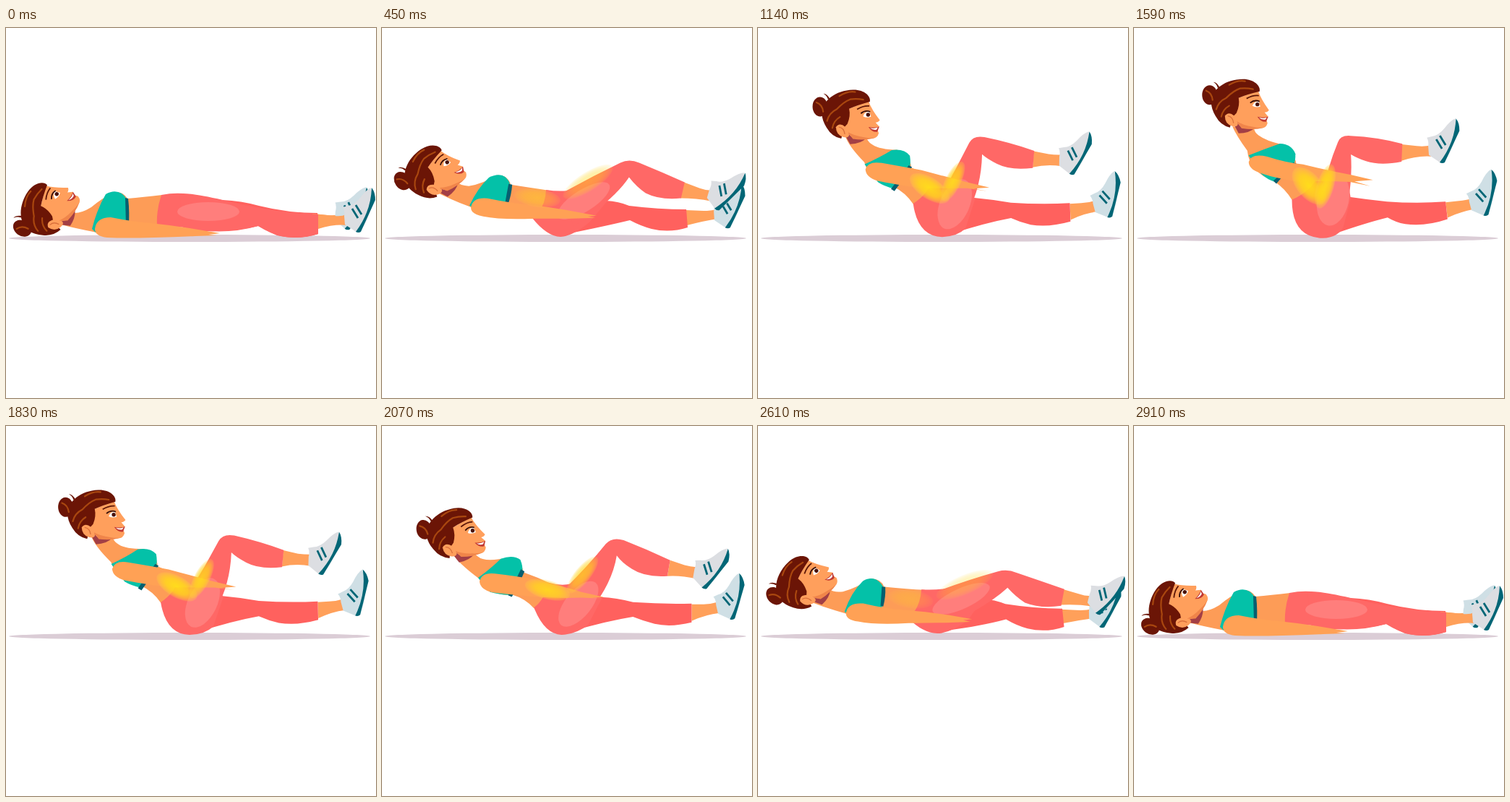
An HTML page that plays this animation: 512x512 px, repeating every 3.6 s.

```html
<!DOCTYPE html>
<html lang="en">
<head>
<meta charset="utf-8">
<title>Crunch exercise</title>
<style>
  html, body { margin: 0; width: 100%; height: 100%; overflow: hidden; background: #fff; }
  svg { display: block; width: 100%; height: 100%; }
</style>
</head>
<body>
<svg viewBox="0 0 512 512">
  <defs>
    <radialGradient id="glow">
      <stop offset="0" stop-color="#ffe414"/>
      <stop offset=".55" stop-color="#ffd81c" stop-opacity=".92"/>
      <stop offset=".78" stop-color="#ffd426" stop-opacity=".65"/>
      <stop offset="1" stop-color="#ffd83a" stop-opacity=".2"/>
    </radialGradient>
    <g id="shoe">
      <path d="M444 125Q437 128 429 139Q421 149 412 150L405 152Q408 157 407 164L408 176L425 187Q438 180 447 142Z"/>
      <path fill="#006676" d="M445 125Q450 131 450 142L430 186Q427 188 423 186Q444 158 445 125Z"/>
      <path stroke="#006676" stroke-width="2.8" d="M418 154L426 167M423 149L431 162"/>
    </g>
  </defs>
  <ellipse cx="254" cy="291" rx="250" ry="5" fill="#dbcdd6"/>
  <path id="farAnkle" fill="#ffa05a"/>
  <use id="farShoe" href="#shoe" fill="#cfdfe5"/>
  <path id="farLeg" fill="#ff615e"/>
  <path id="torso" fill="#fd9c57"/>
  <g id="head">
    <path fill="#a33f45" d="M137 128L169 137Q161 145 146 145Z"/>
    <path fill="#6b1506" d="M117 82Q116 77 111 74Q116 74 120 82Z"/>
    <ellipse cx="106" cy="92" rx="10.5" ry="13.5" fill="#6b1506"/>
    <path fill="#ff9f5c" d="M140 98L173 86Q177 98 188 113Q186 116 182 116L187 122L184 125L186 131Q184 138 177 138Q162 140 150 137Q142 130 138 118Z"/>
    <path fill="#f0854a" d="M143 128Q152 134 166 136Q175 138 181 137Q168 141 150 138Z"/>
    <path fill="#6b1506" d="M108 101C109 84 128 70 152 70C168 70 177 80 175 87Q158 91 146 96Q148 106 143 117L138 122L134 137Q121 134 114 121Q108 111 108 101Z"/>
    <g fill="none" stroke="#a9470f" stroke-width="2.2" stroke-linecap="round">
      <path d="M101 86Q109 89 110 99M115 112Q118 101 129 96Q139 86 148 83Q157 82 166 84M122 122Q124 112 133 107M133 78Q145 71 155 73"/>
    </g>
    <path fill="#ff9f5c" d="M140 121Q132 114 127 121Q127 132 137 135Q144 137 145 132Z"/>
    <path fill="none" stroke="#d9703c" stroke-width="1.3" d="M131 121Q138 122 139 131"/>
    <path fill="none" stroke="#5b1608" stroke-width="1.8" d="M157 97Q166 92 174 93"/>
    <path fill="#fff" d="M165 107Q168 100 174 101L176 108Q170 110 165 107Z"/>
    <circle cx="172" cy="105" r="2.7" fill="#4a1209"/>
    <path fill="none" stroke="#38100a" stroke-width="1.8" d="M162 103Q168 98 175 101"/>
    <path fill="#c13832" d="M172 122Q180 124 187 122L184 129Q177 130 172 122Z"/>
    <path fill="#fff" d="M174 123Q180 125 185 123L183 126Q178 127 174 123Z"/>
  </g>
  <path id="bra" fill="#04c1a8"/>
  <path id="band" fill="#075f70"/>
  <path id="hip" fill="#ff6866"/>
  <path id="nearAnkle" fill="#ffa05a"/>
  <use id="nearShoe" href="#shoe" fill="#dcdee2"/>
  <path id="nearLeg" fill="#ff6866"/>
  <circle id="shine" r="1" fill="#ff7e7c"/>
  <path id="arm" fill="#ffa155"/>
  <circle id="bellyGlow" r="1" fill="url(#glow)"/>
  <circle id="thighGlow" r="1" fill="url(#glow)"/>
</svg>
<script>
const LOOP = 3600, STEP = 30, STEPS = 45, LOWER_AT = 1590;
// Progress of the four key poses, from lying flat to fully raised.
const STOPS = [0, .356, .678, 1];
const NUMBER = /-?\d*\.?\d+/g;
const tracks = [];

function track(id, attribute, poses) {
  const values = poses.map(pose => pose.match(NUMBER).map(Number));
  tracks.push({ node: document.getElementById(id), attribute, template: poses[0], values });
}
const shape = (id, ...poses) => track(id, 'd', poses);
const rigid = (id, px, py, ...poses) => track(id, 'transform',
  poses.map(([x, y, turn]) => `translate(${x} ${y}) rotate(${turn}) translate(${-px} ${-py})`));
const oval = (id, ...poses) => track(id, 'transform',
  poses.map(([x, y, rx, ry, turn]) => `translate(${x} ${y}) rotate(${turn}) scale(${rx} ${ry})`));

rigid('head', 105, 92, [22, 278, -56], [27, 213, -34], [55, 147, -11], [106, 91, 0]);
rigid('nearShoe', 409, 170, [470, 266, 0], [453, 230, 21], [434, 206, 15], [408, 168, 0]);
rigid('farShoe', 409, 170, [457, 260, 8], [461, 260, 1], [465, 254, -8], [467, 246, -10]);

shape('torso',
  'M76 272Q95 277 121 282Q140 288 170 284Q190 282 209 272Q240 252 216 231Q190 234 168 236Q162 226 150 227Q132 236 118 248Q105 256 95 256Z',
  'M72 226Q95 238 122 248Q145 264 180 262Q195 262 208 264Q252 252 232 225Q210 222 178 217Q174 203 158 204Q140 216 120 219Q108 219 102 212Z',
  'M95 178Q105 193 133 213Q150 238 180 235Q198 240 210 253Q252 245 234 219Q215 210 194 203Q192 184 175 183Q150 189 138 186Q130 184 125 176Z',
  'M138 135Q144 148 158 168Q160 198 196 212Q210 222 219 237Q262 235 258 210Q250 195 226 187Q224 172 205 160Q185 155 174 147Q168 143 168 136Z');
shape('bra',
  'M119 278Q126 250 138 230Q150 223 160 229Q165 233 166 236L168 270Q145 284 124 283Z',
  'M121 246Q132 222 148 207Q162 200 171 207Q177 213 177 218L172 248Q150 255 128 252Z',
  'M132 212Q150 198 163 185Q180 179 190 186Q194 195 193 203L178 235Q160 234 148 231Z',
  'M160 175Q182 166 204 159Q220 160 225 174Q225 185 222 188L197 212Q186 209 177 200Z');
shape('band',
  'M165 235L169 236Q171 252 170 272L166 272Z',
  'M175 216L180 217Q179 232 174 245L170 244Z',
  'M191 199L196 202Q188 222 179 237L174 235Z',
  'M222 186L226 187Q210 200 198 214L194 210Z');
shape('hip',
  'M215 231Q208 252 209 272Q225 275 250 276Q275 280 300 281L300 238Q260 229 245 229Q230 228 215 231Z',
  'M227 224Q226 250 208 263Q228 288 247 289Q265 288 288 268L312 239Q290 225 275 222Q252 228 227 224Z',
  'M229 217Q226 240 210 252Q225 288 248 289Q268 288 285 275L305 238Q285 220 272 216Q252 224 229 217Z',
  'M256 206Q245 226 219 237Q218 290 262 291Q283 290 290 275L300 236Q298 210 290 195Q272 198 256 206Z');
shape('farLeg',
  'M250 238L300 238Q325 239 350 246Q390 256 431 256L432 285Q405 293 380 288Q365 284 349 274Q310 284 250 280Z',
  'M250 250L310 239Q328 240 342 246Q382 251 421 251L423 276Q398 284 373 278Q358 274 343 266Q310 274 260 284Z',
  'M250 245L303 237Q325 238 347 244Q388 247 428 246L428 272Q400 279 377 274Q362 270 347 264Q310 270 262 284Z',
  'M255 240L300 234Q325 238 350 240Q392 243 431 240L434 264Q402 275 375 271Q362 269 351 262Q320 270 275 286Z');
shape('nearLeg',
  'M240 229Q285 234 325 244Q340 247 350 249Q390 256 432 258L432 285Q405 294 375 287Q360 280 349 274Q300 288 245 276Z',
  'M250 228Q290 206 330 187Q342 181 356 187Q388 200 419 214L414 236Q385 239 365 229Q352 220 342 207Q322 237 265 275Z',
  'M250 228Q285 195 311 164Q320 154 336 159Q368 172 400 187L396 209Q365 211 347 199Q333 190 326 180Q318 225 275 270Z',
  'M262 230Q266 195 281 158Q284 148 298 149Q336 150 370 159L369 184Q340 190 320 184Q308 180 299 175Q303 235 285 275Z');
shape('nearAnkle',
  'M424 257L455 260Q465 261 470 258L472 273Q455 271 432 278Z',
  'M418 214L440 222Q448 225 456 225L456 240Q435 236 413 236Z',
  'M400 187L420 194Q428 196 436 197L436 213Q415 208 396 209Z',
  'M369 160L390 162Q400 163 410 161L410 176Q390 175 368 183Z');
shape('farAnkle',
  'M425 257L445 259Q458 260 465 256L468 272Q450 270 430 272Z',
  'M420 252L445 253Q455 253 462 251L464 264Q445 267 422 273Z',
  'M428 247L445 247Q455 247 465 244L467 259Q448 261 428 270Z',
  'M431 241L450 239Q460 238 466 236L471 250Q452 254 434 262Z');
shape('arm',
  'M123 278Q125 262 145 262Q175 268 200 270Q230 273 260 278L296 284L280 286L292 287L262 288Q235 289 205 290Q165 291 140 290Q123 288 123 278Z',
  'M123 249Q125 234 146 236Q180 243 205 245Q240 249 265 254L297 260L285 261L295 263L262 264Q240 264 210 264Q165 266 140 261Q123 258 123 249Z',
  'M134 217Q137 204 155 206Q190 210 215 215Q245 222 275 231L306 238L290 239L304 240L275 239Q245 240 215 238Q175 235 152 232Q135 228 134 217Z',
  'M160 184Q163 172 186 177Q212 186 235 188Q272 197 302 202L332 209L306 211L328 218L300 212Q262 210 228 212Q192 206 175 199Q160 194 160 184Z');

oval('shine', [280, 254, 43, 13, 0], [279, 239, 42, 15, -32], [272, 246, 38, 18, -50], [276, 236, 37, 22, -80]);
oval('bellyGlow', [205, 252, 30, 12, 5], [215, 235, 32, 13, 8], [228, 227, 32, 13, 14], [243, 218, 31, 17, 52]);
oval('thighGlow', [285, 240, 42, 12, 5], [285, 213, 40, 13, -32], [278, 206, 32, 11, -50], [264, 220, 32, 12, -75]);
track('bellyGlow', 'opacity', ['0', '.35', '.75', '.9']);
track('thighGlow', 'opacity', ['0', '.4', '.65', '.9']);

function progress(time) {
  const lowering = time >= LOWER_AT;
  const step = lowering
    ? Math.max(0, STEPS - 1 - Math.floor((time - LOWER_AT) / STEP))
    : Math.min(STEPS, Math.floor(time / STEP));
  const x = step / STEPS;
  return x + (lowering ? .5 : .36) * x * x * (1 - x);
}

// Lagrange weights give one smooth curve through all key poses.
const weightsAt = p => STOPS.map((a, i) =>
  STOPS.reduce((w, b, j) => i === j ? w : w * (p - b) / (a - b), 1));

function draw(time) {
  const weights = weightsAt(progress(time));
  for (const { node, attribute, template, values } of tracks) {
    let n = 0;
    node.setAttribute(attribute, template.replace(NUMBER, () => {
      const value = weights.reduce((sum, w, i) => sum + w * values[i][n], 0);
      n++;
      return value.toFixed(2);
    }));
  }
}

const start = performance.now();
function tick() {
  draw((performance.now() - start) % LOOP);
  requestAnimationFrame(tick);
}
tick();
</script>
</body>
</html>
```
